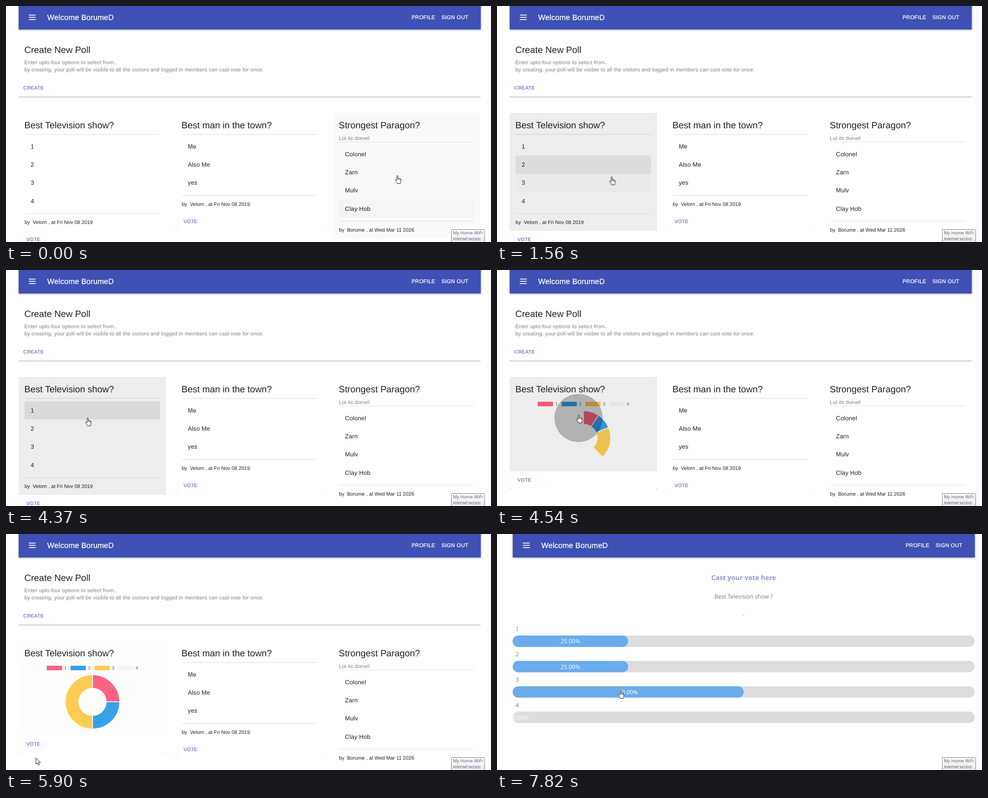
Recreate the animation shown at these times as an HTML page. Size 1071 by 523 pixels, loop 8 s.

```html
<!DOCTYPE html>
<html lang="en">
<head>
<meta charset="utf-8">
<title>Polls</title>
<style>
  html, body { margin: 0; width: 100%; height: 100%; overflow: hidden; background: #fff; }
  svg { display: block; width: 100%; height: 100%; }
  text { font-family: "Liberation Sans", Arial, sans-serif; white-space: pre; text-rendering: geometricPrecision; fill: #212121; }
  .h5 { font-size: 20.16px; }
  .item { font-size: 13.44px; letter-spacing: .00938em; }
  .body { font-size: 11.76px; letter-spacing: .01071em; fill: #808080; }
  .by { font-size: 11.15px; }
  .btn { font-size: 10.92px; letter-spacing: .02857em; fill: #3f51b5; }
  .bar text { fill: #fff; stroke: #fff; stroke-width: .3px; }
  .brand { font-size: 16.8px; letter-spacing: .0075em; }
  .nav { font-size: 11.76px; letter-spacing: .02857em; }
  .key { font-size: 10.08px; fill: #666; }
  .ui { font-family: "Open Sans", "Noto Sans", sans-serif; font-size: 12.6px; fill: #7a7a7a; }
  .mid { text-anchor: middle; }
  .rule { fill: #000; opacity: .13; }
</style>
</head>
<body>
<svg id="stage" viewBox="0 0 1071 523" preserveAspectRatio="none"></svg>
<script>
const LOOP = 8000, CHART_AT = 4430, PRESS = 4375, VOTE_PRESS = 6640, WAIT_AT = 6800, PAGE_AT = 7230;
const ROW = 40.3, CARD_W = 325, TOP = 237;

const cards = [
  { x: 28, title: 'Best Television show?', opts: ['1', '2', '3', '4'], by: 'Velorn', date: 'Fri Nov 08 2019' },
  { x: 375, title: 'Best man in the town?', opts: ['Me', 'Also Me', 'yes'], by: 'Velorn', date: 'Fri Nov 08 2019' },
  { x: 722.2, title: 'Strongest Paragon?', sub: 'Lol its dorvel', opts: ['Colonel', 'Zarn', 'Mulv', 'Clay Hob'], by: 'Borume', date: 'Wed Mar 11 2026' }
];
cards.forEach(c => {
  c.head = c.sub ? 300.8 : 284;
  c.rows = c.head + 7.2;
  c.foot = c.rows + ROW * c.opts.length + 7;
  c.end = c.foot + 39;
});

// Pointer hot spot: time, x, y
const path = [
  [-60, 864, 540], [-55, 864, 440], [-15, 864, 440], [-10, 864, 376], [390, 864, 376], [1100, 262, 313],
  [1200, 262, 313], [1410, 262, 338], [1490, 262, 338], [1560, 253, 379], [1750, 256, 399], [2340, 262, 275],
  [2400, 262, 275], [2510, 258, 275], [2600, 258, 275], [2850, 252, 300], [3160, 245, 270], [3360, 244, 268],
  [3460, 244, 268], [4210, 180, 330], [4370, 180, 328], [4600, 180, 320], [5270, 180, 320], [5900, 66, 496],
  [6180, 66, 496], [6380, 61, 463], [7580, 61, 463], [7820, 272, 347]
];

const clamp = v => Math.max(0, Math.min(1, v));
const smooth = u => u * u * (3 - 2 * u);

function pointer(t) {
  const i = path.findIndex(k => k[0] > t);
  if (i < 1) return (i ? path[path.length - 1] : path[0]).slice(1);
  const a = path[i - 1], b = path[i], u = smooth((t - a[0]) / (b[0] - a[0]));
  return [a[1] + (b[1] - a[1]) * u, a[2] + (b[2] - a[2]) * u];
}

const inBox = ([px, py], x, y, w, h) => px >= x && px < x + w && py >= y && py < y + h;
const cardEnd = (i, t) => i === 0 && t >= CHART_AT ? 446 : cards[i].end;
const overCard = (i, t) => inBox(pointer(t), cards[i].x, TOP, CARD_W, cardEnd(i, t) - TOP);
const overRow = (i, j, t) => inBox(pointer(t), cards[i].x + 13, cards[i].rows + j * ROW, 299, ROW);
const overButton = t => inBox(pointer(t), 35, 453, 53, 25);

// A linear fade of a yes/no state: its mean over the last d ms
function fade(test, t, d) {
  let n = 0;
  for (let i = 0; i < 16; i++) n += test(t - d * (i + .5) / 16);
  return n / 16;
}

const text = (x, y, cls, s) => `<text x="${x}" y="${y}" class="${cls}">${s}</text>`;
const rect = (x, y, w, h, attr = '') => `<rect x="${x}" y="${y}" width="${w}" height="${h}" ${attr}/>`;
const rule = (c, y) => rect(c.x + 13, y, 299, 1, 'class="rule"');
const corners = (x, y) => `<path d="M${x} ${y - 2}q0 2 2 2M${x + CARD_W - 2} ${y}q2 0 2 -2" fill="none" stroke="#000" stroke-opacity=".25"/>`;

function cardBody(c, i) {
  const rows = c.opts.map((o, j) => {
    const y = c.rows + j * ROW;
    return rect(c.x + 13, y, 299, ROW, `id="row${i}${j}" opacity="0"`) + text(c.x + 26.4, y + 24.6, 'item', o);
  }).join('');
  return rule(c, c.head) + rows + rule(c, c.foot) +
    text(c.x + 13, c.foot + 23.4, 'by', `by  ${c.by} , at ${c.date}`) +
    text(c.x + 17, c.foot + 61.6, 'btn', 'VOTE');
}

const slices = [['#ff6384', 0, .25], ['#36a2eb', .25, .5], ['#ffce56', .5, 1], ['#fbf3fd', 1, 1]];
const chart = slices.map(([fill], i) =>
  rect(90 + i * 52.6, 292, 33.6, 10, `fill="${fill}"`) + text(128.5 + i * 52.6, 300, 'key', i + 1) +
  `<path id="arc${i}" fill="${fill}" stroke="#fff" stroke-width="1.7"/>`).join('');

const bars = [25, 25, 50, 0].map((v, i) => {
  const y = 225 + i * 56.2, w = 10.205 * v;
  return text(41, y - 10, 'ui', i + 1) + rect(34.5, y, 1020.5, 25.2, 'rx="12.6" fill="#ddd"') +
    (v ? rect(34.5, y, w, 25.2, 'rx="12.6" fill="#6aacec"') : '') +
    `<text x="${v ? 34.5 + w / 2 : 34}" y="${y + 17.4}" class="ui${v ? ' mid' : ''}" style="fill:#fff">${v}.00%</text>`;
}).join('');

document.getElementById('stage').innerHTML = `
  <defs>
    <clipPath id="cardClip">${rect(28, TOP, CARD_W, 209, 'id="clipBox"')}</clipPath>
    <clipPath id="btnClip">${rect(34.8, 453, 53.4, 25.6, 'rx="3.4"')}</clipPath>
    <linearGradient id="tip" x2="0" y2="1"><stop stop-color="#fff"/><stop offset="1" stop-color="#e4e5f0"/></linearGradient>
  </defs>
  ${rect(0, 0, 1071, 523, 'fill="#fff"')}
  <g id="polls">
    ${rect(28, 69, 1020, 132.3, 'rx="3.4" fill="#fff" style="filter:drop-shadow(0 1px .6px rgba(0,0,0,.42))"')}
    ${rect(26, 66, 1024, 30, 'fill="#fff" opacity=".75"')}
    ${text(40.6, 103.5, 'h5', 'Create New Poll')}
    ${text(40.6, 128.6, 'body', 'Enter upto four options to select from..')}
    ${text(40.6, 145.4, 'body', 'by creating, your poll will be visible to all the visitors and logged in members can cast vote for once.')}
    ${text(38.2, 185.2, 'btn', 'CREATE')}
    ${cards.map((c, i) => `
      <g id="body${i}">${cardBody(c, i)}</g>
      ${i ? '' : `<g id="chart">${chart}${corners(28, 485)}
        ${rect(34.8, 453, 53.4, 25.6, 'rx="3.4" fill="#3f51b5" id="btnHover"')}
        ${text(45, 469, 'btn', 'VOTE')}
        <circle id="btnRipple" cx="61" cy="464" fill="#3f51b5" opacity=".3" clip-path="url(#btnClip)"/></g>`}
      ${text(c.x + 12.6, 270.6, 'h5', c.title)}
      ${c.sub ? text(c.x + 12.8, 296.6, 'body', c.sub) : ''}
      ${rect(c.x, TOP, CARD_W, c.end - TOP, `id="shade${i}" opacity="0"`)}`).join('')}
    ${corners(375.3, 496.4)}
    <circle id="ripple" cx="180" cy="328" clip-path="url(#cardClip)"/>
    <g id="status">
      <path d="M-1 523V505H349q4 0 4 4V523Z" fill="#dee1e6" stroke="#c4c7cc" stroke-width=".8"/>
      <text x="0" y="517.6" class="ui" style="font-size:9.2px;fill:#444">ng for votegrovebackend.lumbrine.test...</text>
    </g>
  </g>
  <g id="vote">
    <text x="544.7" y="102.4" class="ui mid" style="font-size:14.7px;font-weight:700;fill:#8f98cd">Cast your vote here</text>
    ${text(544.7, 143, 'ui mid', 'Best Television show ?')}
    ${text(544.7, 180.5, 'ui mid', '.')}
    ${bars}
  </g>
  <g id="header" class="bar">
    ${rect(28, -6, 1020.4, 58, 'fill="#3f51b5" style="filter:drop-shadow(0 1.5px 2px rgba(0,0,0,.4))"')}
    <path d="M50.4 20.1h15.2M50.4 25.2h15.2M50.4 30.2h15.2" stroke="#fff" stroke-width="1.7"/>
    ${text(91, 30.9, 'brand', 'Welcome BorumeD')}
    ${text(895.4, 29.3, 'nav', 'PROFILE')}
    ${text(961.6, 29.3, 'nav', 'SIGN OUT')}
  </g>
  ${rect(983.5, 495.5, 73.5, 32, 'rx="1.5" fill="url(#tip)" stroke="#767676"')}
  <text x="987" y="506.4" class="ui" style="font-size:9.8px;fill:#575757">My Home WiFi</text>
  <text x="987" y="519" class="ui" style="font-size:9.4px;font-style:italic;fill:#575757">Internet access</text>
  <g id="pointer" fill="#fff" stroke="#111" stroke-linejoin="round">
    <g id="hand" transform="translate(-5 -1)">
      <path d="M4 11.5V1.8C4 .2 6.6 .2 6.6 1.8V7.2C7 6 9 6.2 9.1 7.4C9.7 6.5 11.2 6.8 11.3 8.2C12 7.5 13 8 13 9.2V13C13 15 12 15.8 11.8 18.5H5.2C5 16.5 2.8 14.6 .8 11.3C0 9.8 1.6 9 2.5 10Z"/>
      <path d="M6.6 7V10.2M9.1 7.4V10.4M11.3 8.2V10.6" fill="none" stroke-width=".8"/>
    </g>
    <path id="arrow" d="M0 0V14.2L3.2 11.2L5.6 16.4L7.8 15.4L5.5 10.5H10Z"/>
  </g>`;

const el = {};
document.querySelectorAll('[id]').forEach(e => el[e.id] = e);
const set = (id, k, v) => el[id].setAttribute(k, v);
const show = (id, on) => { el[id].style.display = on ? '' : 'none'; };

function ring(from, to) {
  const at = (r, f) => `${191 + r * Math.sin(f * 2 * Math.PI)} ${372 - r * Math.cos(f * 2 * Math.PI)}`;
  const big = to - from > .5 ? 1 : 0;
  return `M${at(60, from)}A60 60 0 ${big} 1 ${at(60, to)}L${at(30.2, to)}A30.2 30.2 0 ${big} 0 ${at(30.2, from)}Z`;
}

function draw(t) {
  const onVote = t >= PAGE_AT, onChart = t >= CHART_AT;
  show('polls', !onVote);
  show('vote', onVote);
  show('body0', !onChart);
  show('chart', onChart);
  show('status', t >= WAIT_AT);
  set('header', 'transform', `translate(${onVote ? 6.8 : 0})`);

  cards.forEach((c, i) => {
    const end = cardEnd(i, t);
    set('shade' + i, 'height', end - TOP);
    set('shade' + i, 'opacity', .072 * fade(s => overCard(i, s), t, 250));
    c.opts.forEach((o, j) => set(`row${i}${j}`, 'opacity', .08 * fade(s => overRow(i, j, s), t, 150)));
  });

  const p = 1 - Math.pow(1 - clamp((t - CHART_AT) / 1000), 4);
  slices.forEach(([, a, b], i) => set('arc' + i, 'd', b > a && p > 0 ? ring(a * p, b * p) : ''));

  set('clipBox', 'height', cardEnd(0, t) - TOP);
  set('ripple', 'r', 244 * smooth(clamp((t - PRESS) / 550)));
  set('ripple', 'opacity', .3 * (1 - clamp((t - PRESS - 80) / 550)));
  set('btnHover', 'opacity', .08 * fade(overButton, t, 250));
  set('btnRipple', 'r', 28 * smooth(clamp((t - VOTE_PRESS) / 550)));

  const pos = pointer(t);
  const hand = onVote ? pos[1] < 420
    : cards.some((c, i) => overCard(i, t)) || (overButton(t) && t < WAIT_AT);
  set('pointer', 'transform', `translate(${pos[0]} ${pos[1]})`);
  show('hand', hand);
  show('arrow', !hand);
}

const start = performance.now();
function tick() {
  draw((performance.now() - start) % LOOP);
  requestAnimationFrame(tick);
}
tick();
</script>
</body>
</html>
```
